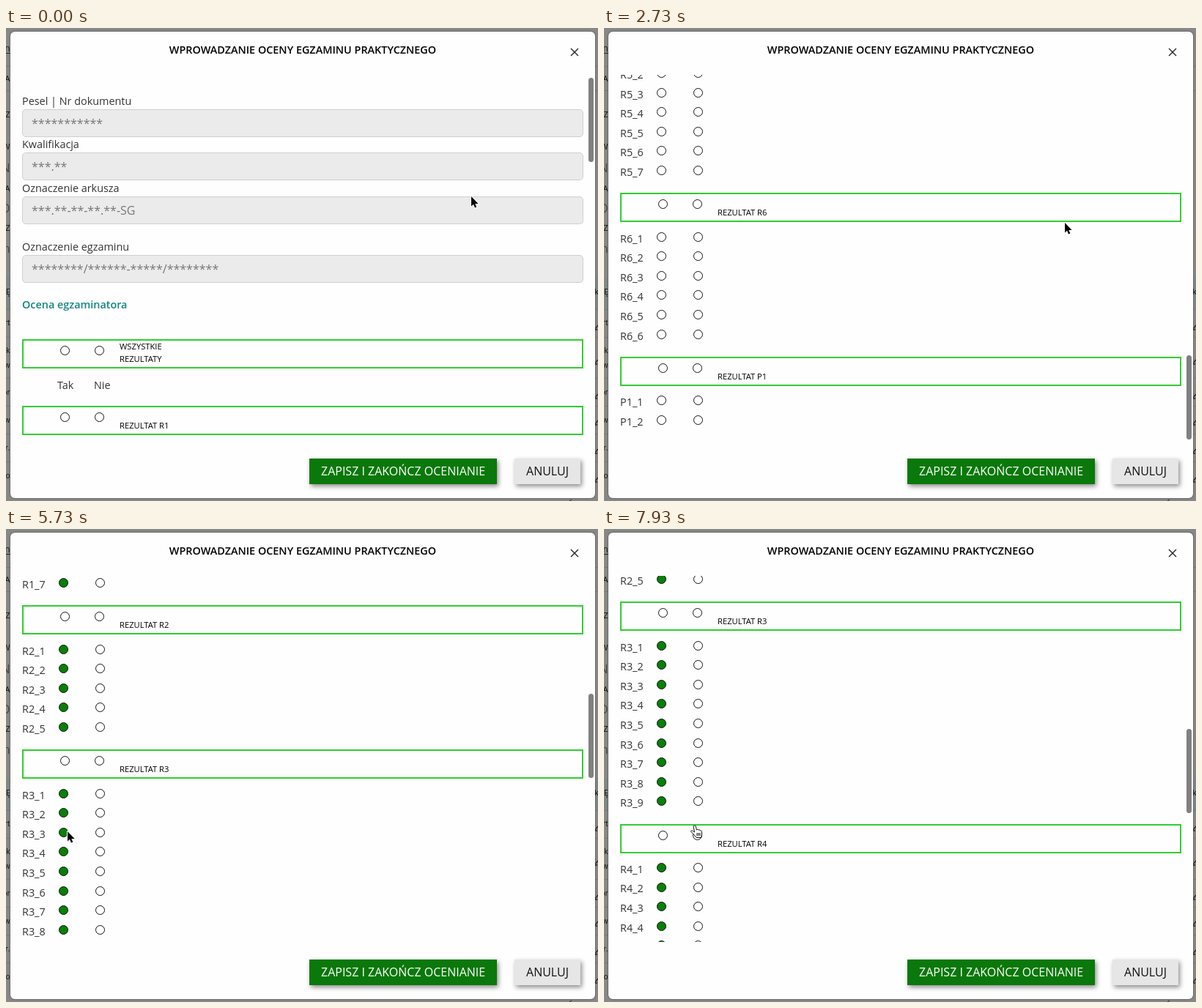
Recreate the animation shown at these times as an HTML page. Size 808 by 646 pixels, loop 8 s.

```html
<!DOCTYPE html>
<html lang="pl">
<head>
<meta charset="utf-8">
<title>Wprowadzanie oceny</title>
<style>
html, body { margin: 0; width: 100%; height: 100%; overflow: hidden; background: #878787; }
svg { display: block; font: 14.4px "Open Sans", sans-serif; }
.label { fill: #333; }
.value { font-size: 16px; fill: #777; }
.small { font-size: 11.2px; fill: #000; }
.bold { font-weight: 600; }
.button { font-size: 16px; }
.field { fill: #ebebeb; stroke: #cfcfcf; }
.frame { fill: none; stroke: #32cd32; stroke-width: 2; }
.radio { fill: #fff; stroke: #111; }
.done .yes { fill: #078007; }
.raised { filter: drop-shadow(2px 3px 3px rgba(0, 0, 0, .45)); }
</style>
</head>
<body>
<svg id="stage" width="808" height="646" viewBox="0 0 808 646">
  <defs><clipPath id="view"><rect x="6" y="64" width="789" height="500"/></clipPath></defs>
  <g id="page"></g>
  <rect x="6" y="5" width="798" height="637" rx="6" fill="#fefefe" style="filter:drop-shadow(0 0 1px #444)"/>
  <text class="bold" x="405" y="35" text-anchor="middle">WPROWADZANIE OCENY EGZAMINU PRAKTYCZNEGO</text>
  <path d="M771 28l10 10m0-10l-10 10" stroke="#222" stroke-width="1.4"/>
  <g clip-path="url(#view)"><g id="form"></g></g>
  <rect id="thumb" x="795" width="7" height="115" rx="3.5" fill="#808080"/>
  <rect class="raised" x="414" y="588" width="256" height="35" fill="#0a780a"/>
  <text class="button" x="430" y="611" fill="#fff">ZAPISZ I ZAKOŃCZ OCENIANIE</text>
  <rect class="raised" x="694" y="588" width="90" height="35" fill="#e6e6e6"/>
  <text class="button" x="710" y="611" fill="#111">ANULUJ</text>
  <g id="click" fill="none">
    <circle cx="77" cy="455" r="20.3" stroke="#fff" stroke-width="5"/>
    <circle cx="77" cy="455" r="20" stroke="#000" stroke-width="2.8"/>
  </g>
  <g id="cursor" stroke-linejoin="round">
    <path id="arrow" d="M0 0V13.5L3 10.7L5 15.5L7.3 14.5L5.3 9.9H9.6Z" stroke="#fff" stroke-width="2" paint-order="stroke"/>
    <path id="hand" fill="#fff" stroke="#111" d="M-1 1.2C-1-.6 2-.6 2.2 1L3.4 6C4 5 5.6 5 6 6.2C6.8 5.4 8.2 5.8 8.4 7C9.4 6.4 10.4 7.2 10.4 8.4L10.6 12L9.6 16.5H3L-.6 12L-4 8.6C-5 7-3 6-1.6 7.4L.6 9ZM4 10v4m2-4v4m2-4v4"/>
  </g>
</svg>
<script>
const $ = id => document.getElementById(id);
const LOOP = 8000, STEP = 1000 / 15;

const text = (cls, x, y, s) => `<text class="${cls}" x="${x}" y="${y}">${s}</text>`;
const radio = (x, y, cls = '') => `<circle class="radio ${cls}" cx="${x}" cy="${y}" r="6"/>`;
const frame = y => `<rect class="frame" x="23" y="${y + 1}" width="764" height="38"/>` +
  radio(80.5, y + 15.5) + radio(127.5, y + 15.5);
const field = (y, label, value) => text('label', 22, y - 6, label) +
  `<rect class="field" x="22.5" y="${y + .5}" width="765" height="37" rx="4.5"/>` +
  text('value', 35, y + 25, value);

function buildForm() {
  let out = field(122, 'Pesel | Nr dokumentu', '***********') +
    field(181, 'Kwalifikacja', '***.**') +
    field(241, 'Oznaczenie arkusza', '***.**-**-**.**-SG') +
    field(321, 'Oznaczenie egzaminu', '********/******-*****/********') +
    '<text class="bold" x="22" y="394" fill="#128580">Ocena egzaminatora</text>' +
    frame(436) +
    '<circle id="focus" cx="80.5" cy="451.5" r="9.5" fill="none" stroke="#000" stroke-width="2"/>' +
    text('small', 155, 450, 'WSZYSTKIE') + text('small', 155, 467, 'REZULTATY') +
    text('label', 70, 504, 'Tak') + text('label', 120, 504, 'Nie');
  let top = 527;
  const sections = { R1: 7, R2: 5, R3: 9, R4: 9, R5: 7, R6: 6, P1: 2 };
  for (const [name, rows] of Object.entries(sections)) {
    const y = Math.round(top);
    out += frame(y) + text('small', 155, y + 31, 'REZULTAT ' + name);
    for (let i = 0; i < rows; i++) {
      const cy = top + 59.8 + i * 26.6, snapped = Math.floor(cy + .01) + .5;
      out += text('label', 22, Math.round(cy + 7.5), `${name}_${i + 1}`) +
        radio(78.5, snapped, 'yes') + radio(128.5, snapped);
    }
    top += 64 + rows * 26.6;
  }
  return out;
}

// Slivers of the dimmed page around the dialog
function buildPage() {
  const words = [['n', 32, 12], ['ZA', 73, 11], ['RZ', 122, 11], ['W', 166, 11], ['N', 197, 16],
    ['IA', 223, 11], ['O', 252, 16], ['OZ', 277, 11], ['n', 307, 16], ['IĘ', 364, 10],
    ['rt', 406, 10], ['ek', 444, 10], ['w', 464, 10], ['or', 501, 10], ['w', 539, 10],
    ['dr.', 577, 10], ['to', 615, 10]];
  let out = '<rect y="340" width="808" height="44" fill="#7f8688"/>';
  for (const y of [52, 85, 384, 422, 478, 516, 554, 592]) out += `<path d="M0 ${y}.5H808" stroke="#777"/>`;
  for (const [s, y, size] of words)
    out += `<text x="5.5" y="${y}" text-anchor="end" font-size="${size}" fill="${size > 15 ? '#444' : '#111'}">${s}</text>`;
  for (const y of [408, 455, 502, 538, 577, 616])
    out += `<path d="M804 ${y + 3}l4-5m-4 6h3" stroke="#222" stroke-width="1.3"/>`;
  return out + '<path d="M0 34.5H6M769 646l3-2" stroke="#222"/>' + text('small', 803, 364, 'k');
}

const scrollKeys = [[0, 11], [67, 40], [267, 330], [467, 570], [667, 700], [867, 740], [1067, 740],
  [1333, 930], [1400, 930], [1600, 1034], [1867, 1250], [2133, 1340], [2200, 1340], [2467, 1540],
  [2733, 1606], [2800, 1606], [2933, 1400], [3200, 700], [3467, 150], [3667, 0], [4533, 0],
  [4667, 25], [4867, 140], [5067, 303], [5667, 640], [6267, 942], [6933, 1400], [7133, 1530],
  [7267, 1585], [7533, 1606], [7600, 1606], [7733, 1300], [7933, 875]];
const cursorKeys = [[0, 635, 230], [867, 634, 241], [933, 634, 242], [1133, 634, 242], [1600, 633, 253],
  [2733, 629, 266], [3467, 629, 266], [3733, 560, 300], [4200, 77, 453], [4533, 77, 453],
  [4800, 90, 455], [5067, 90, 455], [6267, 79, 379], [7600, 79, 379], [7933, 123, 405]];
const thumbKeys = [[0, 1], [4000, 1], [4200, 0], [4533, 0], [4600, 1]];

function at(keys, t) {
  const i = keys.findIndex(k => k[0] > t);
  if (i < 0) return keys[keys.length - 1].slice(1);
  const a = keys[i - 1], b = keys[i], p = (t - a[0]) / (b[0] - a[0]);
  return a.slice(1).map((v, j) => v + (b[j + 1] - v) * p);
}

const show = (id, on) => $(id).setAttribute('visibility', on ? 'visible' : 'hidden');

function draw(now) {
  const t = Math.round(Math.floor((now % LOOP + 3.4) / STEP) * STEP);
  const scroll = Math.round(at(scrollKeys, t)[0]);
  const [x, y] = at(cursorKeys, t).map(Math.round);
  const clicked = t >= 4260;
  $('form').setAttribute('transform', `translate(0 ${-scroll})`);
  $('form').setAttribute('class', clicked ? 'done' : '');
  $('thumb').setAttribute('y', Math.round(65.4 + scroll * .2378));
  $('thumb').setAttribute('opacity', at(thumbKeys, t)[0]);
  $('cursor').setAttribute('transform', `translate(${x} ${y})`);
  show('focus', clicked);
  show('click', clicked && t < 4460);
  show('hand', t >= 7900);
  show('arrow', t < 7900);
}

$('page').innerHTML = buildPage();
$('form').innerHTML = buildForm();
const tick = () => { draw(performance.now()); requestAnimationFrame(tick); };
tick();
</script>
</body>
</html>
```
